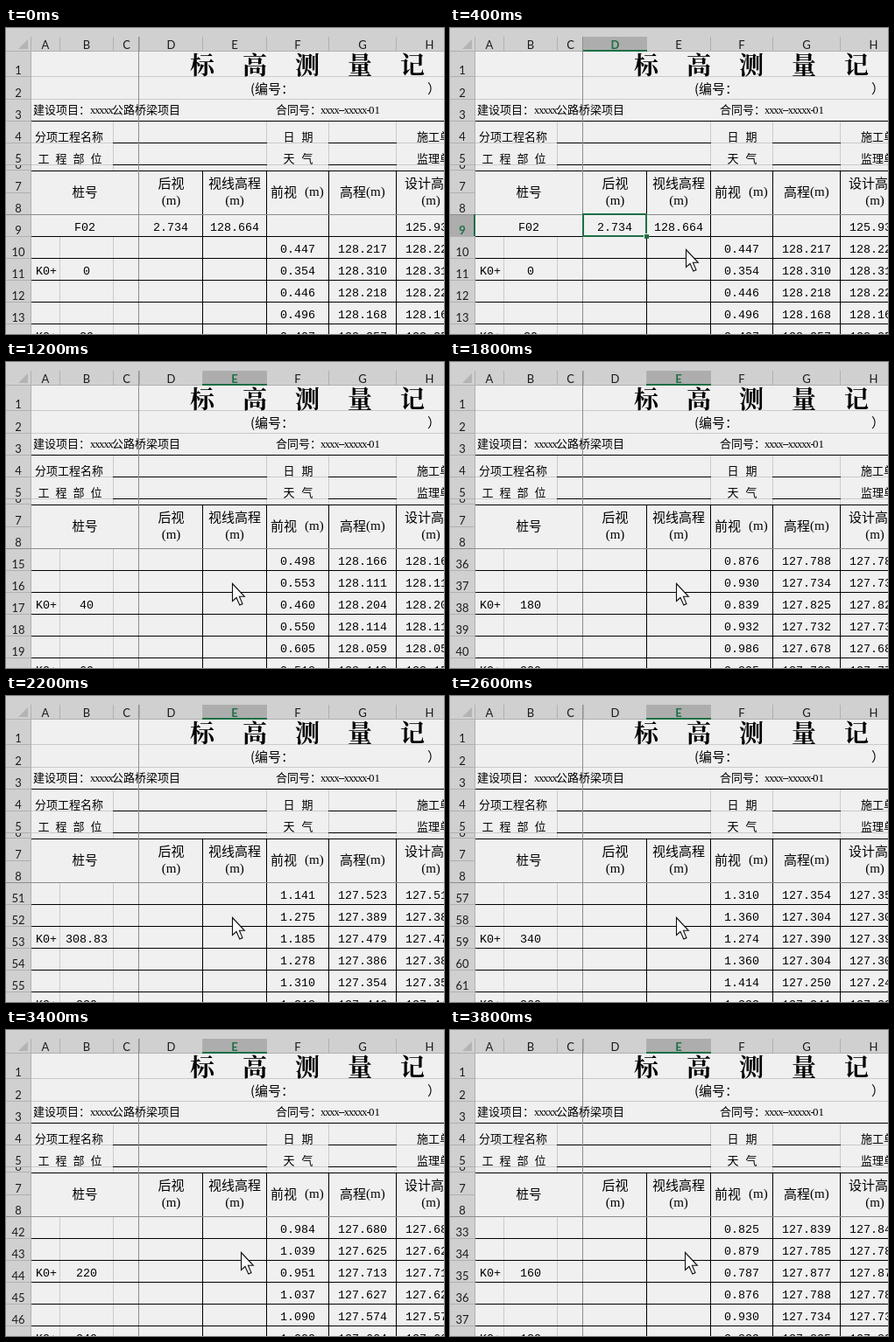
Animation, 500 px wide and 350 px high, one loop 4 s. Source, as an HTML page:

```html
<!DOCTYPE html>
<html lang="zh-CN">
<head>
<meta charset="utf-8">
<style>
html, body { margin: 0; width: 100%; height: 100%; overflow: hidden; background: #f0f0f0; }
svg { display: block; width: 500px; height: 350px; }
text { white-space: pre; }
.cjk { font-family: "Noto Sans CJK SC", "Noto Sans CJK", sans-serif; }
.title { font-family: "Noto Serif CJK SC", "Noto Sans CJK SC", "Noto Sans CJK", serif; font-weight: 700; }
.mono { font-family: "Liberation Mono", monospace; }
.serif { font-family: "Liberation Serif", serif; }
.head { font-family: Lato, sans-serif; }
</style>
</head>
<body>
<svg viewBox="0 0 500 350">
  <g id="sheet"></g>
  <g id="live"></g>
  <path id="cursor" d="M.5 .5V20.5L5 16.5 8.8 25 12 23.6 8.4 15.3H14.3Z" fill="#fafafa" stroke="#111" stroke-width="1.1"/>
</svg>
<script>
const LOOP = 4000, STEP = 200;
const GREEN = '#1f6f45', INK = '#000', HEADER = '#d0d0d0', SHADE = '#adadad';
const GRID = '#cacaca', EDGE = '#b0b0b0', FREEZE = '#8c8c8c';
const COLS = [28, 61, 122, 152, 224, 297, 368, 445, 521];
const ROWS = [27, 56, 82, 107, 132, 157, 163, 189, 214];
const DATA_TOP = 213, ROW_H = 25, SIGHT = 128.664;
const colMid = i => (COLS[i] + COLS[i + 1]) / 2;

const rect = (x, y, w, h, fill) => `<rect x="${x}" y="${y}" width="${w}" height="${h}" fill="${fill}"/>`;
const hLine = (x1, x2, y, color = INK) => rect(x1, y, x2 - x1, 1, color);
const vLine = (x, y1, y2, color = INK) => rect(x, y1, 1, y2 - y1, color);

// Text centred vertically on y.
function text(str, x, y, size, cls, { anchor = 'start', fill = INK, extra = '' } = {}) {
  const drop = cls === 'cjk' || cls === 'title' ? 0.37 : 0.34;
  return `<text class="${cls}" x="${x}" y="${y + size * drop}" font-size="${size}" text-anchor="${anchor}" fill="${fill}" ${extra}>${str}</text>`;
}
const mid = { anchor: 'middle' };
const label = (str, x, y, active) => text(str, x, y, 13, 'head',
  { anchor: 'middle', fill: active ? GREEN : '#1c1c1c', extra: active ? 'font-weight="700"' : '' });
const spread = (str, x, step, y, size, cls) =>
  [...str].map((ch, i) => text(ch, x + i * step, y, size, cls, mid)).join('');

function drawSheet() {
  let s = rect(0, 0, 500, 27, HEADER) + rect(0, 0, 29, 350, HEADER);
  s += '<path d="M25 13V24H14Z" fill="#b4b4b4"/>';
  s += hLine(0, 500, 26, EDGE) + vLine(28, 10, 350, EDGE);
  COLS.slice(1, 8).forEach(x => s += vLine(x, 10, 26, EDGE));
  ROWS.slice(1).forEach(y => s += hLine(0, 28, y - 1, EDGE));
  [1, 2, 3, 4, 5, 7, 8].forEach(n => s += label(n, 14, ROWS[n] - 7.5));
  s += `<svg y="157" width="28" height="5">${label(6, 14, 0)}</svg>`;

  // Form heading
  [55, 81, 131, 156].forEach(y => s += hLine(29, 500, y, GRID));
  [122, 297, 368, 445].forEach(x => s += vLine(x, 107, 163, GRID));
  s += hLine(29, 500, 106);
  [131, 156].forEach(y => s += hLine(122, 298, y) + hLine(368, 446, y));
  s += spread('标高测量记', 224, 60, 43, 28, 'title');
  s += text('(编号：', 279, 69, 15, 'cjk') + text('）', 481, 69, 15, 'cjk');
  const tight = { extra: 'letter-spacing="-1.1"' };
  s += text('建设项目：', 31, 93, 13, 'cjk') + text('xxxxx', 96, 94, 12.5, 'serif', tight);
  s += text('公路桥梁项目', 121, 93, 13, 'cjk') + text('合同号：', 308, 93, 13, 'cjk');
  s += text('xxxx--xxxxx-', 359, 94, 12.5, 'serif', tight) + text('01', 414, 94, 13, 'serif');
  s += text('分项工程名称', 33, 124, 13, 'cjk') + spread('工程部位', 43, 20, 149, 13, 'cjk');
  s += spread('日期', 323, 21, 124, 13, 'cjk') + spread('天气', 323, 21, 149, 13, 'cjk');
  s += text('施工单位', 469, 124, 13, 'cjk') + text('监理单位', 469, 149, 13, 'cjk');

  // Table heading
  s += hLine(29, 500, 163);
  [224, 297, 368, 445].forEach(x => s += vLine(x, 163, 350));
  s += text('桩号', 90, 188, 14.5, 'cjk', mid);
  [['后视', 188.5], ['视线高程', 261], ['设计高程', 485]].forEach(([name, x]) =>
    s += text(name, x, 177, 15, 'cjk', mid) + text('(m)', x, 197, 15, 'serif', mid));
  s += text('前视', 302, 187, 15, 'cjk') + text('(m)', 341, 187, 15, 'serif');
  s += text('高程', 381, 187, 15, 'cjk') + text('(m)', 411, 187, 15, 'serif');
  return s + hLine(0, 500, 213, FREEZE) + vLine(151, 10, 350, FREEZE);
}

// Foresight readings by first row; other rows follow the design gradient.
const readings = {};
[[10, [.447, .354, .446, .496, .407, .498, .553, .460, .550, .605, .518]],
 [33, [.825, .879, .787, .876, .930, .839]],
 [42, [.984, 1.039, .951, 1.037, 1.090, 1.000]],
 [51, [1.141, 1.275, 1.185, 1.278, 1.310, 1.218, 1.310, 1.360, 1.274, 1.360, 1.414, 1.323]]
].forEach(([first, list]) => list.forEach((v, i) => readings[first + i] = v));

function survey(row) {
  const k = Math.round((row - 11) / 3), centre = (row - 11) % 3 === 0;
  const stake = k === 14 ? 308.83 : 20 * (k > 14 ? k + 1 : k);
  const design = 128.313 - 0.00271 * stake - (centre ? 0 : 0.091);
  const sight = readings[row] ?? SIGHT - design + 0.002;
  return { stake: centre ? stake : null, sight, level: SIGHT - sight, design };
}

function drawRow(row, y, selected) {
  const cell = (str, x) => text(str, x, y + 14, 13.333, 'mono', mid);
  let s = selected ? rect(0, y + 1, 28, ROW_H - 1, SHADE) : '';
  s += label(row, 14, y + 18.5, selected);
  s += hLine(0, 28, y + ROW_H, EDGE) + hLine(29, 500, y + ROW_H);
  if (row === 9)
    return s + cell('F02', 90) + cell('2.734', 188) + cell('128.664', 261) + cell('125.930', 484);
  s += vLine(61, y + 1, y + ROW_H, GRID) + vLine(122, y + 1, y + ROW_H, GRID);
  const { stake, sight, level, design } = survey(row);
  if (stake !== null) s += cell('K0+', 46) + cell(stake, 92);
  return s + cell(sight.toFixed(3), 333) + cell(level.toFixed(3), 407) + cell(design.toFixed(3), 484);
}

function drawSelection(col, y, dx, dy) {
  const x = COLS[col] + dx, w = COLS[col + 1] - COLS[col], top = y + dy;
  const right = x + w, bottom = top + ROW_H;
  return `<rect x="${x}" y="${top}" width="${w}" height="${ROW_H}" fill="none" stroke="${GREEN}" stroke-width="2"/>` +
    rect(right - 3, bottom - 3, 6, 6, '#f0f0f0') + rect(right - 2, bottom - 2, 5, 5, GREEN);
}

// First visible scrolling row for each step.
const TOPS = [9, 9, 9, 9, 9, 9, 15, 21, 30, 36, 45, 51, 54, 57, 60, 54, 48, 42, 39, 33];

function cursorAt(step) {
  if (step < 1) return [-50, -50];
  if (step < 2) return [285, 262];
  if (step < 3) return [269, 253];
  if (step < 5) return [257, 251];
  return step < 15 ? [258, 253] : [268, 254];
}

function drawLive(step) {
  const top = TOPS[step];
  const col = step < 2 ? -1 : step < 4 ? 3 : 4;
  const row = step < 2 ? -1 : step < 4 ? 9 : 10;
  let s = '';
  if (col >= 0) s += rect(COLS[col] + 1, 10, COLS[col + 1] - COLS[col] - 1, 16, SHADE) +
    rect(COLS[col], 25, COLS[col + 1] - COLS[col] + 1, 2, GREEN);
  [...'ABCDEFGH'].forEach((ch, i) => s += label(ch, colMid(i) + .5, 19.5, i === col));
  for (let i = 0; i < 6; i++) s += drawRow(top + i, DATA_TOP + i * ROW_H, top + i === row);
  const y = DATA_TOP + (row - top) * ROW_H;
  if (row >= top) {
    const gliding = step === 4;
    s += rect(27, y, 2, ROW_H, GREEN);
    s += drawSelection(col, y, gliding ? -5 : 0, gliding ? -2 : 0);
  }
  return s;
}

const live = document.getElementById('live'), cursor = document.getElementById('cursor');
document.getElementById('sheet').innerHTML = drawSheet();
const start = performance.now();
let shown = -1;

function render() {
  const step = Math.floor((performance.now() - start) % LOOP / STEP);
  if (step !== shown) {
    live.innerHTML = drawLive(step);
    cursor.setAttribute('transform', `translate(${cursorAt(step)})`);
    shown = step;
  }
  requestAnimationFrame(render);
}
render();
</script>
</body>
</html>
```
